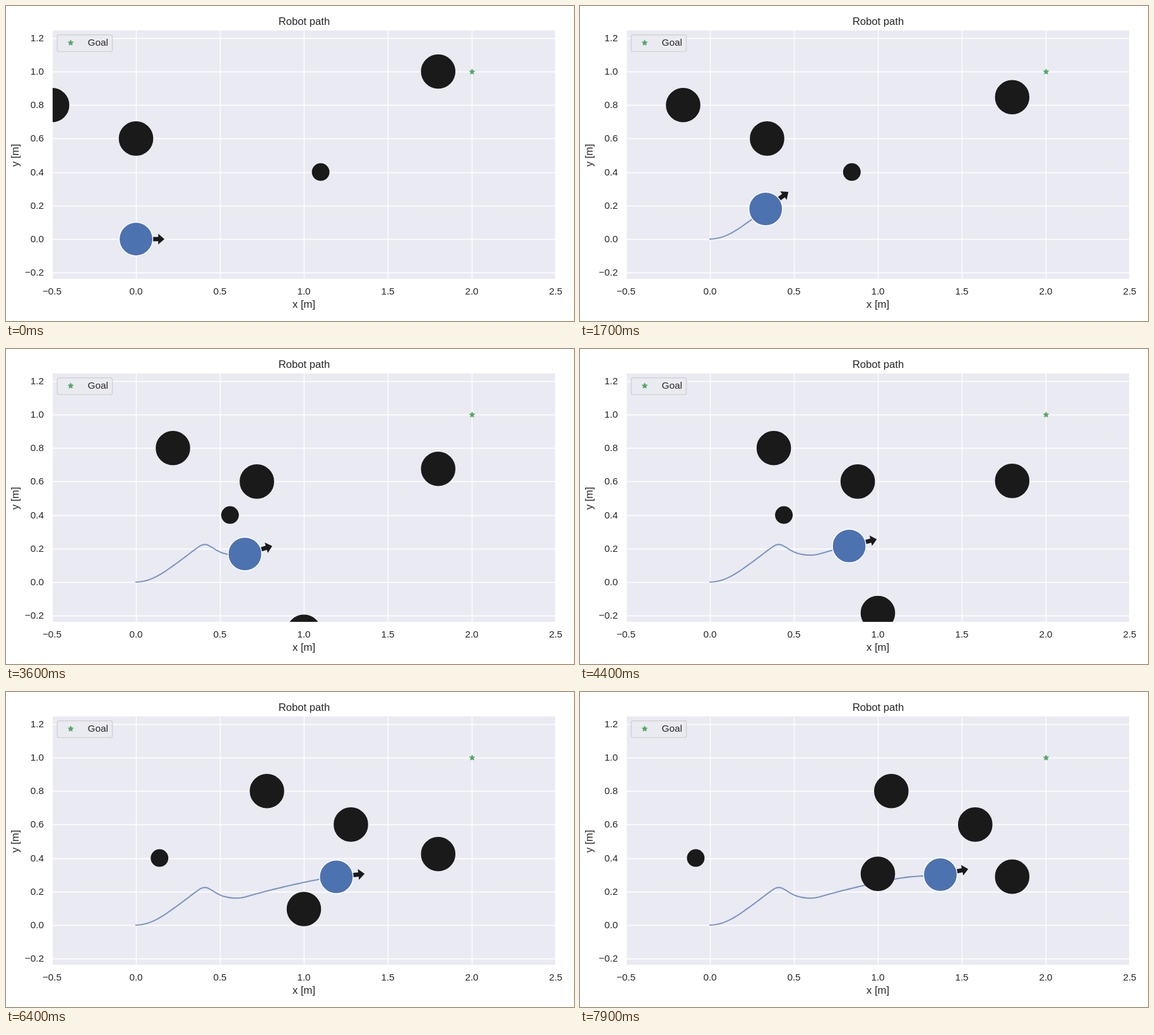
Animation, 900 px wide and 500 px high, one loop 8000 ms. Source, as an HTML page with a canvas:

```html
<!DOCTYPE html>
<html lang="en">
<head>
<meta charset="utf-8">
<title>Robot path</title>
<style>
  html, body { margin: 0; width: 900px; height: 500px; overflow: hidden; background: #fff; }
  canvas { display: block; }
</style>
</head>
<body>
<canvas id="stage" width="900" height="500"></canvas>
<script>
const ctx = document.getElementById('stage').getContext('2d');
const STEP = 100, STEPS = 80, UNIT = 266;
const PANEL = '#eaeaf2', INK = '#262626', DARK = '#1a1a1a', BLUE = '#4c72b0', GREEN = '#55a868';
const FONT = '"Liberation Sans", Arial, sans-serif';
const SMALL = 15.28, LARGE = 16.67, HAIR = 1.39;
const AREA = { left: 73, top: 38, right: 871, bottom: 434 };

const px = x => 206 + UNIT * x;
const py = y => 370 - UNIT * y;

// The robot's course: step, place, heading in degrees and speed per step
const waypoint = (n, x, y, deg, speed) => {
  const a = deg * Math.PI / 180;
  return { n, x, y, vx: speed * Math.cos(a), vy: -speed * Math.sin(a) };
};
const COURSE = [
  waypoint(0, 206, 370, 0, 7),
  waypoint(8, 256.5, 350, 34.8, 6.8),
  waypoint(20, 304, 315, 35, 4),
  waypoint(26, 320.5, 311.6, -24.5, 3.4),
  waypoint(30, 339, 322.2, -25, 5.4),
  waypoint(36, 378.6, 325.4, 16.2, 6.4),
  waypoint(52, 470.2, 302.6, 12.2, 5.2),
  waypoint(64, 523.4, 293.4, 6.1, 4.1),
  waypoint(79, 571, 289.9, 11.5, 2.8)
];

// Obstacles: start, velocity per step, radius
const OBSTACLES = [
  { x: -0.5, y: 0.8, dx: 0.02, dy: 0, r: 0.1 },
  { x: 0, y: 0.6, dx: 0.02, dy: 0, r: 0.1 },
  { x: 1.1, y: 0.4, dx: -0.015, dy: 0, r: 0.05 },
  { x: 1.8, y: 1, dx: 0, dy: -0.009, r: 0.1 },
  { x: 1, y: -0.8, dx: 0, dy: 0.014, r: 0.1 }
];

// Cubic Hermite value and slope
function hermite(p, v, q, w, h, t) {
  const c = 3 * (q - p) - h * (2 * v + w), d = 2 * (p - q) + h * (v + w);
  return { at: p + t * (h * v + t * (c + t * d)), slope: h * v + t * (2 * c + 3 * t * d) };
}

function poseAt(n) {
  const i = COURSE.findIndex((w, k) => k > 0 && n <= w.n);
  const a = COURSE[i - 1], b = COURSE[i], h = b.n - a.n, t = (n - a.n) / h;
  const x = hermite(a.x, a.vx, b.x, b.vx, h, t);
  const y = hermite(a.y, a.vy, b.y, b.vy, h, t);
  return { x: x.at, y: y.at, angle: Math.atan2(y.slope, x.slope) };
}

const POSES = Array.from({ length: STEPS }, (_, n) => poseAt(n));

function line(x1, y1, x2, y2) {
  ctx.beginPath();
  ctx.moveTo(x1, y1);
  ctx.lineTo(x2, y2);
  ctx.stroke();
}

function text(str, x, y, size, align) {
  ctx.font = `${size}px ${FONT}`;
  ctx.textAlign = align;
  ctx.fillStyle = INK;
  ctx.fillText(str, x, y);
}

function disc(x, y, r, fill, edge) {
  ctx.beginPath();
  ctx.arc(x, y, r, 0, 2 * Math.PI);
  ctx.fillStyle = fill;
  ctx.strokeStyle = edge;
  ctx.lineWidth = HAIR;
  ctx.fill();
  ctx.stroke();
}

function star(x, y) {
  ctx.beginPath();
  for (let i = 0; i < 10; i++) {
    const r = i % 2 ? 1.59 : 4.17, a = i * Math.PI / 5;
    ctx.lineTo(x + r * Math.sin(a), y - r * Math.cos(a));
  }
  ctx.closePath();
  ctx.fillStyle = ctx.strokeStyle = GREEN;
  ctx.lineWidth = HAIR;
  ctx.lineJoin = 'bevel';
  ctx.fill();
  ctx.stroke();
}

function arrow(p) {
  ctx.save();
  ctx.translate(p.x, p.y);
  ctx.rotate(p.angle);
  ctx.fillStyle = DARK;
  ctx.fillRect(26, -3.4, 10, 6.8);
  ctx.beginPath();
  ctx.moveTo(35.2, -8.6);
  ctx.lineTo(45, 0);
  ctx.lineTo(35.2, 8.6);
  ctx.fill();
  ctx.restore();
}

const label = v => v.toFixed(1).replace('-', '\u2212');

function drawGrid() {
  const { left, top, right, bottom } = AREA;
  ctx.fillStyle = PANEL;
  ctx.fillRect(left, top, right - left, bottom - top);
  ctx.strokeStyle = '#fff';
  ctx.lineWidth = HAIR;
  for (let i = -1; i <= 5; i++) {
    const x = px(i / 2);
    line(x + 0.5, top, x + 0.5, bottom);
    text(label(i / 2), x, 458, SMALL, 'center');
  }
  for (let i = -1; i <= 6; i++) {
    const y = Math.round(py(i / 5));
    line(left, y + 0.5, right, y + 0.5);
    text(label(i / 5), 60, y + 5, SMALL, 'right');
  }
}

function drawLegend() {
  ctx.beginPath();
  ctx.roundRect(81.2, 45.8, 87.4, 26.6, 3);
  ctx.globalAlpha = 0.8;
  ctx.fillStyle = PANEL;
  ctx.strokeStyle = '#ccc';
  ctx.lineWidth = HAIR;
  ctx.fill();
  ctx.stroke();
  ctx.globalAlpha = 1;
  star(102.5, 58.5);
  text('Goal', 129.6, 63, SMALL, 'left');
}

function drawTrail(n) {
  ctx.beginPath();
  for (const p of POSES.slice(0, n + 1)) ctx.lineTo(p.x, p.y);
  ctx.strokeStyle = BLUE;
  ctx.lineWidth = 2.08;
  ctx.lineJoin = 'round';
  ctx.lineCap = 'square';
  ctx.globalAlpha = 0.7;
  ctx.stroke();
  ctx.globalAlpha = 1;
  ctx.lineCap = 'butt';
}

function drawTitles() {
  text('Robot path', 472.4, 30, LARGE, 'center');
  text('x [m]', 472, 479, LARGE, 'center');
  ctx.save();
  ctx.translate(20, 237);
  ctx.rotate(-Math.PI / 2);
  text('y [m]', 0, 0, LARGE, 'center');
  ctx.restore();
}

function draw(n) {
  const { left, top, right, bottom } = AREA;
  const pose = POSES[n];
  ctx.fillStyle = '#fff';
  ctx.fillRect(0, 0, 900, 500);
  drawGrid();

  ctx.save();
  ctx.beginPath();
  ctx.rect(left, top, right - left, bottom - top);
  ctx.clip();
  drawTrail(n);
  for (const o of OBSTACLES) {
    disc(px(o.x + o.dx * n), py(o.y + o.dy * n), o.r * UNIT, DARK, DARK);
  }
  arrow(pose);
  disc(pose.x, pose.y, 0.1 * UNIT, BLUE, '#fff');
  star(px(2) + 0.5, py(1) + 0.5);
  ctx.restore();

  ctx.strokeStyle = '#fff';
  ctx.lineWidth = 1.74;
  ctx.lineJoin = 'miter';
  ctx.strokeRect(left, top, right - left, bottom - top);
  drawLegend();
  drawTitles();
}

const start = performance.now();
function tick() {
  const elapsed = Math.max(0, performance.now() - start);
  draw(Math.floor(elapsed / STEP) % STEPS);
  requestAnimationFrame(tick);
}
tick();
</script>
</body>
</html>
```
